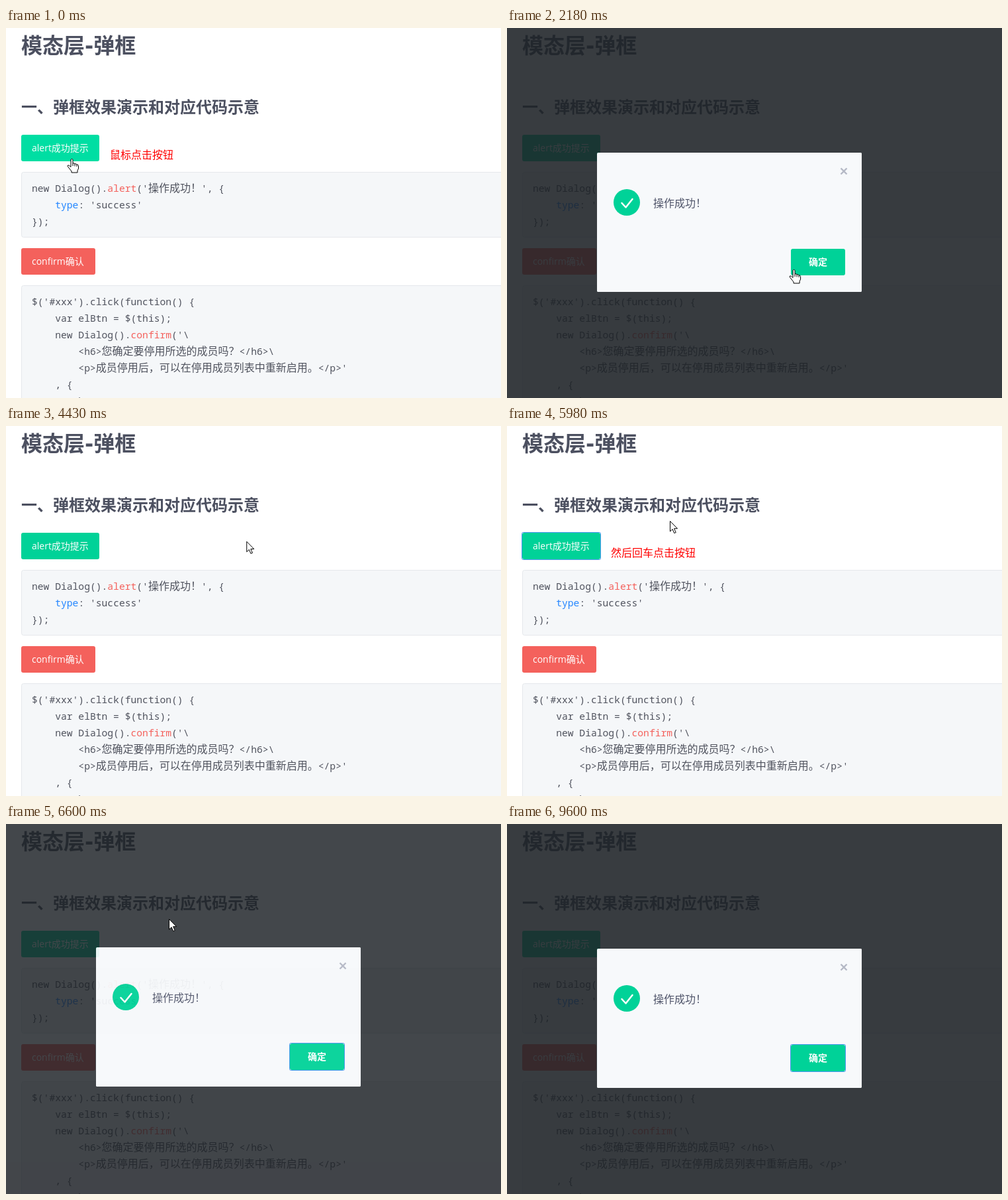
Animation, 748 px wide and 558 px high, one loop 9.69 s. Source, as an HTML page:

```html
<!DOCTYPE html>
<html lang="zh">
<head>
<meta charset="utf-8">
<style>
html, body { margin: 0; width: 100%; height: 100%; overflow: hidden; background: #fff; }
svg { display: block; }
text { font: 16px 'Open Sans', 'Noto Sans CJK SC', 'Noto Sans CJK', sans-serif; fill: #50556a; }
.h1, .h2 { font: 700 32px 'DejaVu Sans', 'Noto Sans CJK SC', 'Noto Sans CJK', sans-serif; fill: #4c5060; }
.h2 { font-size: 24px; }
.btn { font-size: 14px; fill: #fff; }
.bold { font-weight: 700; }
.code { font-family: 'Noto Sans Mono', 'Noto Sans CJK SC', monospace; font-size: 14.667px; fill: #50535e; }
.cjk { font-size: 16px; }
.mid { font-family: 'Noto Sans CJK TC', sans-serif; }
.red { fill: #f4615c; }
.blue { fill: #2486ff; }
.box { fill: #f5f7f9; stroke: #e5e8ec; }
.focus { fill: none; stroke: #4b96f2; }
#note { fill: #f00; }
</style>
</head>
<body>
<svg width="748" height="558" viewBox="0 0 748 558">
  <text class="h1" x="23" y="37.5">模态层-弹框</text>
  <text class="h2" x="23" y="128">一、弹框效果演示和对应代码示意</text>
  <rect id="open" x="23" y="161" width="118" height="40" rx="3"/>
  <rect id="openFocus" class="focus" x="22.5" y="160.5" width="119" height="41" rx="2"/>
  <text class="btn" x="39" y="186">alert成功提示</text>
  <text id="note" x="157" y="197"></text>
  <rect class="box" x="23.5" y="217.5" width="760" height="98" rx="3"/>
  <rect class="red" x="23" y="332" width="112" height="40" rx="3"/>
  <text class="btn" x="39" y="357">confirm确认</text>
  <rect class="box" x="23.5" y="388.5" width="760" height="300" rx="3"/>
  <g id="code"></g>
  <g id="dialog">
    <path fill="#1d2126" fill-opacity=".88" fill-rule="evenodd" d="M-50-50H800V640H-50zM138 188h396q2 0 2 2v206q0 2-2 2H138q-2 0-2-2V190q0-2 2-2z"/>
    <rect x="136" y="188" width="400" height="210" rx="2" fill="#f7f9fb"/>
    <path id="close" d="M504.5 211.5l9 9m0-9l-9 9" stroke-width="2.4"/>
    <circle cx="181" cy="263" r="20" fill="#00d298"/>
    <path d="M173.5 264l6 6.5 10-12.5" fill="none" stroke="#fff" stroke-width="2.5" stroke-linecap="round" stroke-linejoin="round"/>
    <text x="221" y="270">操作成功<tspan class="mid">！</tspan></text>
    <rect id="ok" x="429" y="333" width="82" height="40" rx="3"/>
    <rect id="okFocus" class="focus" x="428.5" y="332.5" width="83" height="41" rx="2"/>
    <text class="btn bold" x="456" y="358">确定</text>
  </g>
  <g id="cursor" fill="#fff" stroke="#000" stroke-linejoin="round">
    <path id="arrow" d="M0 .5V16l3.6-3.4 2.6 6 2.5-1-2.6-5.9h4.9z"/>
    <path id="hand" d="M-1 1.5Q.5-.6 2 1.5V7Q4.5 6 5 8Q7 7 8 9Q10 8.5 10.5 10.5V15L9 18V21H0V19L-4 14Q-7 11-5.5 10Q-4 9.3-1 12.5ZM2 7v4M5 8v3.5M8 9v3"/>
  </g>
</svg>
<script>
const LOOP = 9690, OPEN = 1120, CLOSE = 4130, TAB = 5360, ENTER = 5980, REOPEN = 6500;
const $ = id => document.getElementById(id);
const show = (id, on) => $(id).style.display = on ? '' : 'none';
const clamp = v => Math.min(1, Math.max(0, v));

// {r:..} and {b:..} mark red and blue words
function addCode(y, source) {
  source.split('\n').forEach((line, i) => {
    const body = line.replace(/</g, '&lt;').replace(/ /g, '\u00a0')
      .replace(/[\u3000-\uffff]+/g, '<tspan class="cjk">$&</tspan>')
      .replace(/{r:(\w+)}/g, '<tspan class="red">$1</tspan>')
      .replace(/{b:(\w+)}/g, '<tspan class="blue">$1</tspan>');
    const text = document.createElementNS('http://www.w3.org/2000/svg', 'text');
    text.setAttribute('class', 'code');
    text.setAttribute('x', 39);
    text.setAttribute('y', y + 25 * i);
    text.innerHTML = body;
    $('code').append(text);
  });
}
addCode(247, `new Dialog().{r:alert}('操作成功！', {
    {b:type}: 'success'
});`);
addCode(418, `$('#xxx').click(function() {
    var elBtn = $(this);
    new Dialog().{r:confirm}('\\
        <h6>您确定要停用所选的成员吗？</h6>\\
        <p>成员停用后，可以在停用成员列表中重新启用。</p>'
    , {
        buttons: [{`);

// pointer moves: start, end, x, y
const moves = [
  [900, 960, 98, 191],
  [1780, 2180, 433, 364],
  [2180, 2730, 468, 352],
  [2810, 3990, 505.5, 211],
  [CLOSE, 4680, 246.5, 143],
  [7350, 7750, 580, 310],
  [7750, 8290, 500, 350],
  [8370, 9310, 470, 345],
  [9390, 9600, 770, 580]
];
function pointer(t) {
  let x = 99, y = 197;
  for (const [start, end, toX, toY] of moves) {
    const k = clamp((t - start) / (end - start));
    x += (toX - x) * k;
    y += (toY - y) * k;
  }
  return [x, y];
}

// ease-out fade in, seen in 80 ms steps; the second one is first seen halfway
function opacity(t) {
  if (t < OPEN || t >= CLOSE && t < REOPEN) return 0;
  const begin = t < CLOSE ? OPEN : REOPEN - 206;
  const step = Math.floor((t + 40) / 80) * 80 - 40;
  return 1 - (1 - clamp((step - begin) / 360)) ** 1.53;
}

function note(t) {
  if (t < OPEN) return '鼠标点击按钮';
  if (t < TAB || t >= REOPEN) return '';
  return t < ENTER ? 'Tab键聚焦按钮' : '然后回车点击按钮';
}

const inside = ([x, y], l, t, r, b) => x >= l && x <= r && y >= t && y <= b;
const onOk = p => inside(p, 429, 333, 511, 373);
const green = hover => hover ? '#00dea3' : '#00d298';

function draw(t) {
  const alpha = opacity(t), pos = pointer(t);
  const onOpen = !alpha && inside(pos, 23, 161, 141, 201);
  const hand = onOpen || alpha > 0 && onOk(pos);
  $('open').style.fill = green(onOpen);
  $('ok').style.fill = green(hand && onOk(pointer(t - 90)));
  $('close').style.stroke = inside(pos, 499, 206, 519, 226) ? '#50556a' : '#b5b9c6';
  $('note').textContent = note(t);
  $('dialog').style.opacity = alpha;
  $('dialog').setAttribute('transform', `translate(0 ${Math.floor(-20 * (1 - alpha))})`);
  show('dialog', alpha);
  show('openFocus', t >= TAB && t < REOPEN);
  show('okFocus', t >= REOPEN);
  show('hand', hand);
  show('arrow', !hand);
  $('cursor').setAttribute('transform', `translate(${pos})`);
}
function tick() {
  draw(performance.now() % LOOP);
  requestAnimationFrame(tick);
}
tick();
</script>
</body>
</html>
```
